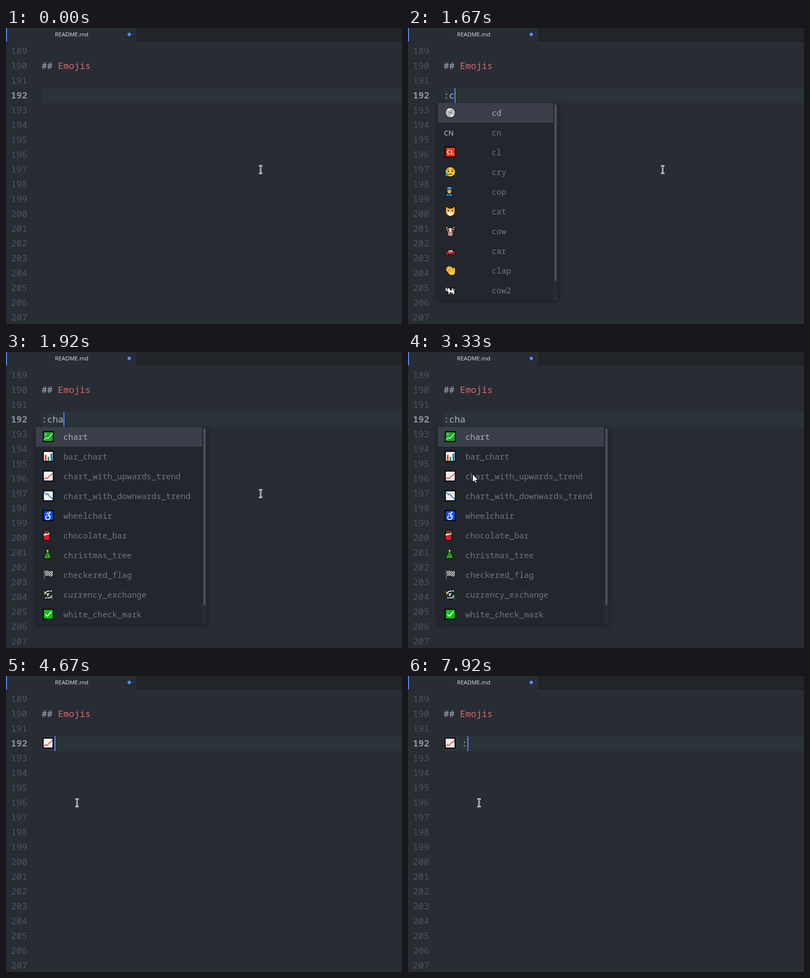
An HTML page for the animation above (8000 ms loop, 800 px wide and 600 px high).

```html
<!DOCTYPE html>
<html lang="en">
<head>
<meta charset="utf-8">
<title>Emoji autocomplete</title>
<style>
  html, body { margin: 0; width: 100%; height: 100%; overflow: hidden; background: #282c33; }
  svg { display: block; }
  text { white-space: pre; }
  .code { font: 500 18.33px "Noto Sans Mono", "DejaVu Sans Mono", monospace; fill: #abb2bf; }
  .num { fill: #4b5261; font-weight: 400; }
  .now { fill: #8b929e; font-weight: 600; }
  .item { font: 16.47px "Noto Sans Mono", "DejaVu Sans Mono", monospace; fill: #6e747f; }
  .first { fill: #a8aeb9; }
  .ui { font: 11.6px "Open Sans", "Noto Sans", sans-serif; fill: #e0e3e8; }
  .popup { filter: drop-shadow(0 2px 4px rgba(0, 0, 0, .4)); }
</style>
</head>
<body>
<svg id="stage" width="800" height="600" viewBox="0 0 800 600">
  <rect width="800" height="600" fill="#282c33"/>
  <rect x="264" width="536" height="27" fill="#212528"/>
  <path d="M264.5 0V26.5H800" fill="none" stroke="#181a1f"/>
  <rect width="2" height="27" fill="#568af2"/>
  <text class="ui" x="99" y="17">README.md</text>
  <circle cx="249" cy="13" r="3.4" fill="#568af2"/>
  <rect x="72" y="122" width="728" height="30" fill="#2a3338"/>
  <g id="gutter"></g>
  <text class="code" x="72" y="83">## <tspan fill="#d8696f">Emojis</tspan></text>
  <g id="inserted"></g>
  <text id="typed" class="code" y="143"></text>
  <rect id="caret" y="122" width="2" height="30" fill="#528bff"/>
  <g id="shortList" class="popup"></g>
  <g id="longList" class="popup"></g>
  <g id="beam" fill="none">
    <path d="M-3.5 -7.5H-1L0 -6.5L1 -7.5H3.5M0 -7.5V7.5M-3.5 7.5H-1L0 6.5L1 7.5H3.5" stroke="#fff" stroke-width="3"/>
    <path d="M-3 -7.5H-1L0 -6.5L1 -7.5H3M0 -6.5V6.5M-3 7.5H-1L0 6.5L1 7.5H3" stroke="#20242a"/>
  </g>
  <path id="arrow" d="M.5 .5V17L4.2 13.6L6.7 19L9.2 18L6.8 12.5H11.8Z" fill="#fff" stroke="#000"/>
</svg>
<script>
const $ = id => document.getElementById(id);

// Icons are drawn around their own centre, about 22px across.
const tile = fill => `<rect x="-10" y="-10" width="20" height="20" fill="${fill}" stroke="#000" stroke-width="2"/>`;
const shape = (d, fill, edge = '#000', w = 1) => `<path d="${d}" fill="${fill}" stroke="${edge}" stroke-width="${w}" stroke-linejoin="round"/>`;
const line = (d, color, w = 1.5) => shape(d, 'none', color, w);
const dot = (x, y, r, fill, edge = 'none') => `<circle cx="${x}" cy="${y}" r="${r}" fill="${fill}" stroke="${edge}"/>`;
const label = (s, x, y, size, fill) =>
  `<text x="${x}" y="${y}" text-anchor="middle" style="font:600 ${size}px 'Open Sans',sans-serif" fill="${fill}">${s}</text>`;
const grid = color => line('M-9 -4.5H9M-9 0H9M-9 4.5H9M-4.5 -9V9M0 -9V9M4.5 -9V9', color, .8);

function flagChecks() {
  let out = '';
  for (let r = 0; r < 5; r++)
    for (let c = 0; c < 8; c++)
      if ((r + c) % 2) out += `<rect x="${-7 + c * 2.1}" y="${-8 + r * 2.1}" width="2.1" height="2.1" fill="#444"/>`;
  return out;
}

const icons = {
  cd: dot(0, 0, 10, '#bdbdbd', '#000') + shape('M0 0L-7 -6.2A9.4 9.4 0 0 1 -1 -9.3ZM0 0L7 6.2A9.4 9.4 0 0 1 1 9.3Z', '#e8e8e8', 'none')
    + dot(0, 0, 3.6, '#d8d8d8', '#777') + dot(0, 0, 1.2, '#111'),
  cn: label('CN', -3, 6.5, 14, '#9da5b4'),
  cl: tile('#e8391d') + label('CL', 0, 4.5, 12.5, '#fff'),
  cry: dot(0, 0, 10, '#ffc83d', '#000') + line('M-7 -4L-3 -6M7 -4L3 -6M-4 6Q0 2.5 4 6', '#4a3210', 1.3)
    + dot(-4, -1, 1.6, '#2b2118') + dot(4, -1, 1.6, '#2b2118') + shape('M-7 1Q-11 6 -8 8.5Q-4 9 -5 5Z', '#35a7ec', '#146ca8', .6),
  cop: shape('M-9 10Q-9 3 -3 3H-1Q5 3 5 10Z', '#1976c9') + shape('M-6.5 -5H2.5V-1Q2 4 -2 4Q-6 4 -6.5 -1Z', '#ffc83d')
    + shape('M-9 -7Q-2 -13 5 -7L3 -4H-7Z', '#2281d2') + dot(-2, -7, 1.4, '#ffd43b')
    + dot(-4, -1, .8, '#222') + dot(0, -1, .8, '#222') + line('M-2 5V10', '#0b3d75', 1),
  cat: shape('M-9 -10L-3 -6H3L9 -10L9.5 0Q9 9 0 10Q-9 9 -9.5 0Z', '#ffc83d') + shape('M-7.5 -7L-4 -4L-7 -2ZM7.5 -7L4 -4L7 -2Z', '#f2803a', 'none')
    + shape('M-6 3Q0 -1 6 3Q5 9 0 9Q-5 9 -6 3Z', '#fff4dc', 'none') + dot(-4, -1, 1.4, '#222') + dot(4, -1, 1.4, '#222')
    + shape('M-1.5 3H1.5L0 5Z', '#d6545e', 'none') + line('M0 -7V-3M-10 4H-6M10 4H6', '#a65d1a', 1),
  cow: shape('M-6 -5Q-10 -5 -9 -10Q-6 -7 -4 -7H4Q6 -7 9 -10Q10 -5 6 -5Z', '#eee1c4') + shape('M-10 -4L-5 -6H5L10 -4L7 0L5 8H-5L-7 0Z', '#a8663f')
    + shape('M-2.5 -6H2.5L2 3H-2Z', '#efe4d5', 'none') + shape('M-5 4Q0 1 5 4Q6 10 0 10Q-6 10 -5 4Z', '#e7a5a1', '#333', .7)
    + dot(-4, -1, 1.2, '#111') + dot(4, -1, 1.2, '#111') + dot(-2, 6, .9, '#73403c') + dot(2, 6, .9, '#73403c'),
  car: shape('M-10 7V3L-6 2L-3 -2H4L7 2L10 3V7Z', '#e5392d') + shape('M-4.5 2L-2 -1H0V2ZM1 2V-1H3.5L5.5 2Z', '#9fd8f2', 'none')
    + dot(-6, 7, 2.3, '#555', '#000') + dot(6, 7, 2.3, '#555', '#000'),
  clap: shape('M-9 -5Q-9 -8 -6 -7L-5 -9Q-3 -11 -1 -8L1 -9L6 -4L7 -7Q10 -7 10 -1Q11 10 3 10Q-2 10 -5 5L-9 0Q-10 -2 -8 -3Z', '#ffc83d')
    + line('M-7 -5L0 2M-4 -8L3 -1M-7 0L-2 5M6 -4L5 1', '#c67b15', 1.1),
  cow2: shape('M-10 -4L-6 -6L-3 -4H8L10 -1V4H9V0L8 9H5V5H-1V9H-4V4L-6 2L-10 1Z', '#f4f4f4')
    + shape('M-1 -4H3Q4 1 1 1Q-2 0 -1 -4ZM6 -4H8L8 2Q5 1 6 -4ZM-7 -5L-5 -5L-5 0L-7 -1Z', '#222', 'none') + shape('M-10 -1H-8V1H-10ZM2 5H5V7H2Z', '#eda1a4', 'none'),
  chart: tile('#16a51c') + grid('#35b03a') + line('M-9 7L-4 2L-1 4L9 -7', '#e8fbe8', 1.3) + line('M-7 -8L-5 -5L-3 -8M-5 -5V-2M-7 -4H-3', '#a5dfa7', .9),
  bar_chart: tile('#fff') + shape('M-7 -3H-3.5V9H-7Z', '#e23a2e', 'none') + shape('M-1.5 1H2V9H-1.5Z', '#20a63a', 'none') + shape('M4.5 -6H8V9H4.5Z', '#1674d1', 'none'),
  chart_with_upwards_trend: tile('#fafafa') + grid('#d5d8da') + line('M-9 7L-5 3L-2 5L3 -1L5 -1L9 -6', '#e4452d', 1.7),
  chart_with_downwards_trend: tile('#fafafa') + grid('#d5d8da') + line('M-9 -8L-4 -2L-1 -4L4 3L6 3L9 8', '#1b79cf', 1.6),
  wheelchair: tile('#0c50ee') + dot(3, -6.5, 1.8, '#fff') + line('M-4 -3L-1 -5L2 -3L0 1H4L3 6', '#fff', 1.8) + line('M-2 0A4.2 4.2 0 1 0 3 5', '#fff', 1.7),
  chocolate_bar: shape('M-9 -10H3V0H-9Z', '#76432c') + line('M-5 -9V-2M-1 -9V-2M-9 -6H3', '#4b2719', 1)
    + shape('M-9.5 -2H2.5V10H-9.5Z', '#e5182c') + shape('M-9.5 -2L-5 -4L-1 -3L2.5 -6V-2L-9.5 1Z', '#e3e5e8', 'none'),
  christmas_tree: shape('M-3.5 7H.5V10H-3.5Z', '#7b4a27') + shape('M-1.5 -9L3 -3H2L5 2H4L7 7H-10L-7 2H-8L-5 -3H-6Z', '#17921f')
    + dot(-1.5, -8.5, 2, '#ffd32a') + dot(-3, -1, 1.1, '#f33d2e') + dot(1, 2, 1.1, '#ffd32a') + dot(-5, 5, 1.1, '#ffd32a') + dot(2.5, 5, 1.1, '#f33d2e'),
  checkered_flag: line('M-9 -9L-8 10', '#000', 3) + line('M-9 -9L-8 10', '#a2a2a2', 1.3)
    + shape('M-8 -8Q-3 -10 1 -8Q5 -7 10 -9L10 3Q5 5 1 3Q-3 2 -7 4Z', '#d8d8d8') + flagChecks(),
  currency_exchange: line('M-7 0Q-6 -7 1 -7H6M7 1Q6 7 0 7H-5', '#000', 4.5) + line('M-7 0Q-6 -7 1 -7H5M7 1Q6 7 0 7H-4', '#f1f1f1', 2)
    + shape('M4 -10L9 -7L4 -4ZM-3 4L-8 7L-3 10Z', '#f1f1f1') + line('M-4 -3L-1 0L2 -3M-1 0V4M-3 1H1', '#f1f1f1', 1.3)
    + line('M-9 -6L-7 -3', '#ef9b25', 2) + line('M6 2Q9 3 7 6Q6 8 9 9', '#20b842', 1.7),
  white_check_mark: tile('#12bf12') + line('M-6 0L-2 4L6 -5', '#fff', 2)
};

const place = (name, x, y) => `<g transform="translate(${x} ${y})">${icons[name]}</g>`;

function popup(width, labelX, names) {
  const rows = names.map((name, i) => {
    const y = 172 + i * 40;
    return place(name, 85.5, y - .5) + `<text class="item ${i ? '' : 'first'}" x="${labelX}" y="${y + 6}">${name}</text>`;
  });
  return `<rect x="60" y="152" width="${width}" height="400" fill="#22262d"/>
    <rect x="${50 + width}" y="152" width="10" height="400" fill="#282b31"/>
    <rect x="60" y="152" width="${width - 10}" height="40" fill="#3a3f49"/>
    <rect x="${53 + width}" y="155" width="4" height="358" rx="2" fill="#4b525e"/>` + rows.join('');
}

const names = Object.keys(icons);
$('shortList').innerHTML = popup(243, 169, names.slice(0, 10));
$('longList').innerHTML = popup(346, 116, names.slice(10));
$('inserted').innerHTML = place('chart_with_upwards_trend', 85, 136);
$('gutter').innerHTML = Array.from({ length: 19 }, (_, i) =>
  `<text class="code ${i === 3 ? 'now' : 'num'}" x="10" y="${53 + i * 30}">${189 + i}</text>`).join('');

const LOOP = 8000, PICK = 4670, CELL = 11;
const typing = [[0, ''], [670, ':'], [1670, ':c'], [1830, ':ch'], [1920, ':cha'], [PICK, ''], [5920, ' '], [6250, ' :']];
const blinks = [250, 1000, 1330, 2250, 2670, 3080, 3500, 3830, 4250, 5000, 5500, 6580, 7080, 7500, 7920];
const moves = [
  [0, 514.5, 287], [3000, 503, 286], [3080, 430, 277], [3170, 300, 264], [3250, 182, 253],
  [3330, 130, 247], [3420, 130, 236], [3500, 130, 227], [3670, 133, 217],
  [4000, 137, 226], [4080, 140, 240], [4170, 142, 251], [4250, 142, 256], [PICK, 143.5, 257]
];

const latest = (keys, t) => keys.filter(k => k[0] <= t).pop();
const show = (id, on) => $(id).setAttribute('display', on ? 'inline' : 'none');

function render(t) {
  const picked = t >= PICK;
  const text = latest(typing, t)[1];
  const left = picked ? 98 : 72;
  $('typed').textContent = text;
  $('typed').setAttribute('x', left);
  $('caret').setAttribute('x', left + text.length * CELL);
  show('caret', blinks.filter(b => b <= t).length % 2);
  show('inserted', picked);
  show('shortList', t >= 1670 && t < 1920);
  show('longList', t >= 1920 && !picked);

  const [, x, y] = latest(moves, t);
  const overList = !picked && x < 406;
  const pointer = overList ? 'arrow' : 'beam';
  show('arrow', overList);
  show('beam', !overList);
  $(pointer).setAttribute('transform', `translate(${x} ${y})`);
}

const start = performance.now();
function tick(now) {
  render(Math.max(0, now - start) % LOOP);
  requestAnimationFrame(tick);
}
render(0);
requestAnimationFrame(tick);
</script>
</body>
</html>
```
